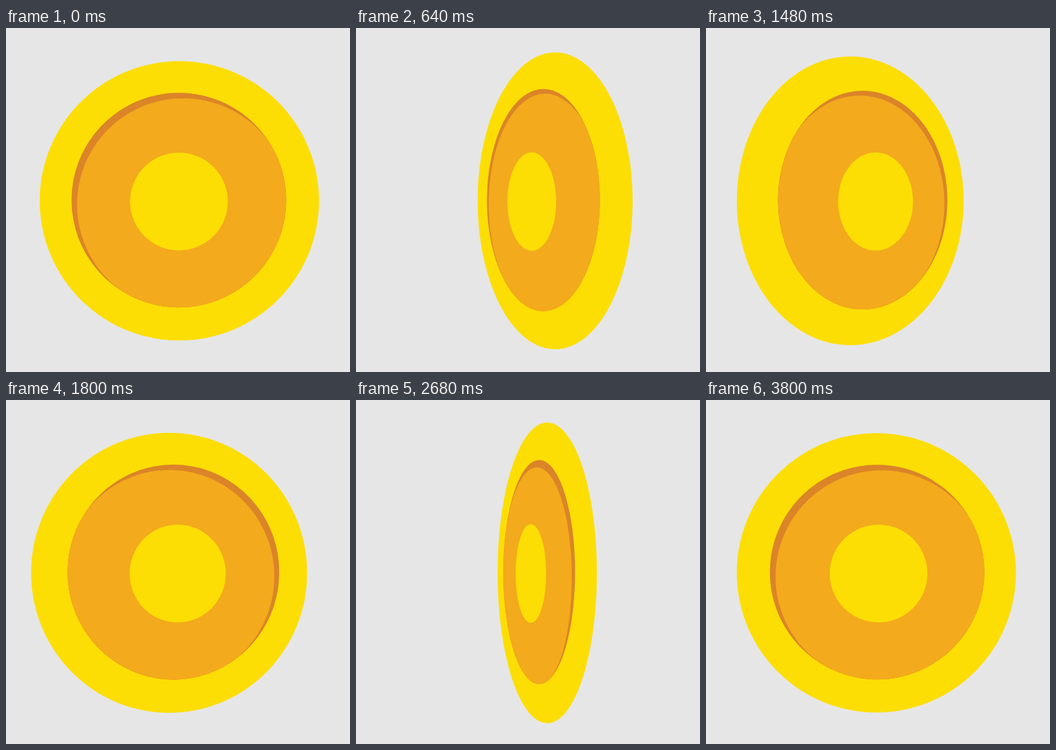
Write an HTML page with a canvas that moves like this. It is 500x500 px and loops after 3.84 s.

```html
<!DOCTYPE html>
<html lang="en">
<head>
<meta charset="utf-8">
<title>Spinning coin</title>
<style>
  html, body { margin: 0; width: 100%; height: 100%; overflow: hidden; background: #e6e6e6; }
  canvas { display: block; width: 500px; height: 500px; }
</style>
</head>
<body>
<canvas id="stage" width="500" height="500"></canvas>
<script>
const ctx = document.getElementById('stage').getContext('2d');
const LOOP = 3840, FRAME = 40;
const CENTER_X = 251.3, CENTER_Y = 251.2;
const CAMERA = 522;          // distance from the viewer to the coin's axis
const STEPS = 180;

// Path of a circle on the coin's face, turned about the vertical axis.
function circlePath(x, y, radius, angle) {
  const path = new Path2D();
  for (let i = 0; i < STEPS; i++) {
    const a = i / STEPS * 2 * Math.PI;
    const px = x + radius * Math.cos(a);
    const py = y + radius * Math.sin(a);
    const scale = CAMERA / (CAMERA - px * Math.sin(angle));
    path.lineTo(CENTER_X + px * Math.cos(angle) * scale, CENTER_Y + py * scale);
  }
  path.closePath();
  return path;
}

function draw(time) {
  const angle = (0.5 + time * 0.0939) * Math.PI / 180;
  const disc = (x, y, radius, color) => {
    const path = circlePath(x, y, radius, angle);
    ctx.fillStyle = color;
    ctx.fill(path);
    return path;
  };

  ctx.fillStyle = '#e6e6e6';
  ctx.fillRect(0, 0, 500, 500);
  disc(0, 0, 203, '#fcde05');
  const recess = disc(-0.4, -1, 156, '#db8428');
  ctx.save();
  ctx.clip(recess);
  disc(6, 5.4, 154.4, '#f3aa1c');
  ctx.restore();
  disc(0, 1, 71, '#fcde05');
}

function tick() {
  const time = performance.now() % LOOP;
  draw(Math.floor(time / FRAME) * FRAME);
  requestAnimationFrame(tick);
}
tick();
</script>
</body>
</html>
```
